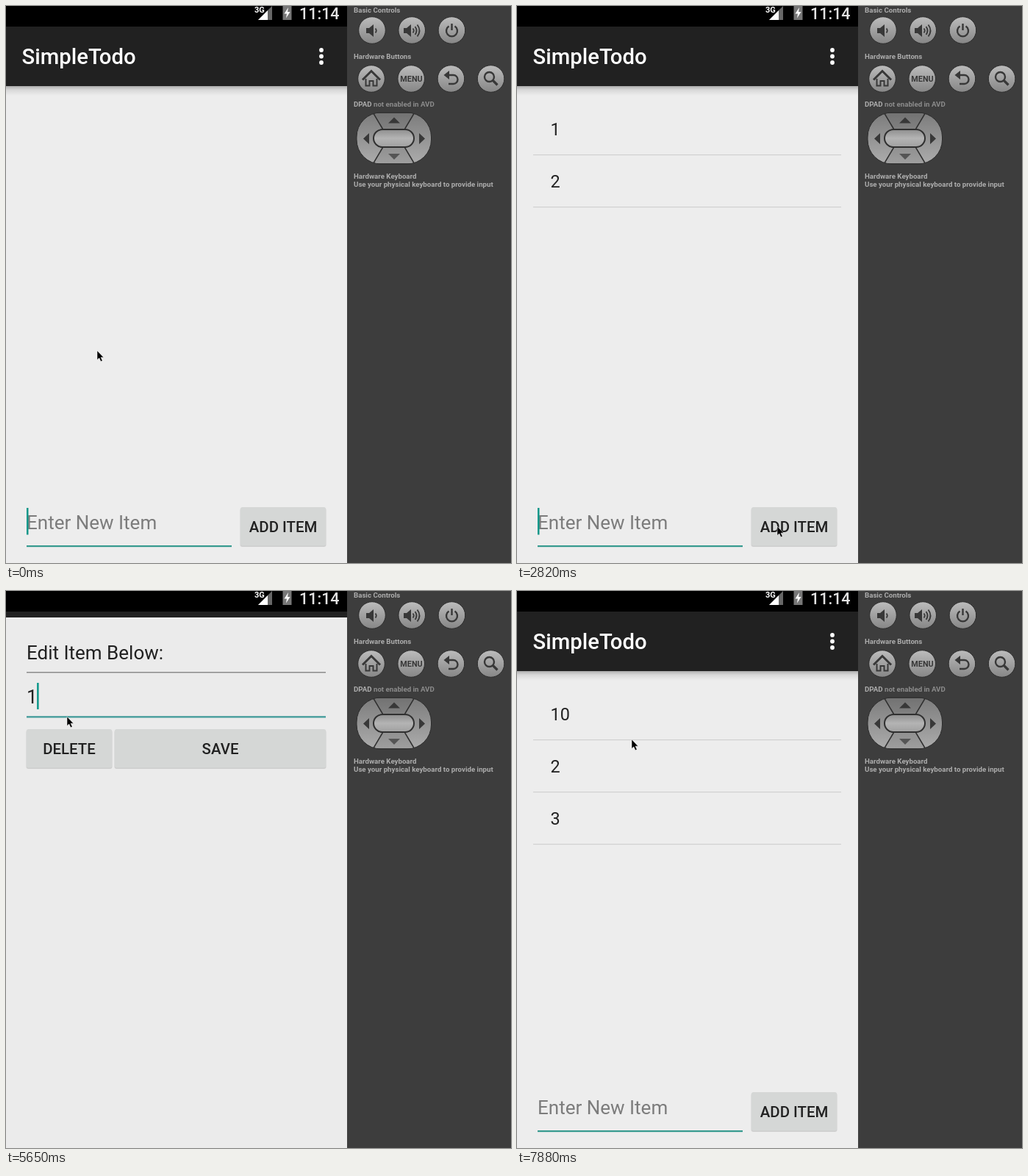
An HTML page that plays this animation: 687 px wide and 758 px high, repeating every 8000 ms.

```html
<!DOCTYPE html>
<html lang="en">
<head>
<meta charset="utf-8">
<title>Todo app demo</title>
<style>
  html, body { margin: 0; width: 100%; height: 100%; overflow: hidden; background: #3d3d3d }
  svg { display: block; font-family: Roboto, sans-serif }
  .field { font-size: 26px; fill: #212121 }
  .row { font-size: 23.4px; fill: #212121 }
  .btn { font-size: 20.4px; font-weight: 500; fill: #212121; text-anchor: middle }
  .label { font-size: 9.7px; font-weight: 700; fill: #adadad }
  .hint { fill: #7c7c7c }
  .caret { fill: #0c978a }
  .icon { fill: none; stroke: #383838; stroke-width: 2.4 }
  .solid { fill: #383838; stroke: none }
</style>
</head>
<body>
<svg width="687" height="758" viewBox="0 0 687 758">
  <defs>
    <linearGradient id="metal" x2="0" y2="1">
      <stop stop-color="#bcbcbc"/><stop offset="1" stop-color="#868686"/>
    </linearGradient>
    <linearGradient id="plate" x2="0" y2="1">
      <stop stop-color="#7c7c7c"/><stop offset="1" stop-color="#acacac"/>
    </linearGradient>
    <linearGradient id="pill" x2="0" y2="1">
      <stop stop-color="#8e8e8e"/><stop offset=".5" stop-color="#b4b4b4"/><stop offset="1" stop-color="#a0a0a0"/>
    </linearGradient>
    <linearGradient id="shade" x2="0" y2="1">
      <stop stop-color="#000" stop-opacity=".27"/><stop offset=".4" stop-color="#000" stop-opacity=".09"/>
      <stop offset="1" stop-color="#000" stop-opacity="0"/>
    </linearGradient>
    <clipPath id="screen"><path d="M0 28H464V758H0z"/></clipPath>
    <clipPath id="pad"><rect x="477" y="145" width="101.500" height="70" rx="33"/></clipPath>
  </defs>

  <!-- list screen -->
  <rect width="464" height="758" fill="#ededed"/>
  <rect y="109" width="464" height="13" fill="url(#shade)"/>
  <rect y="28" width="464" height="81" fill="#212121"/>
  <text x="21.500" y="79" font-size="29.300" font-weight="500" fill="#fff">SimpleTodo</text>
  <g fill="#fff"><circle cx="429" cy="60" r="2.900"/><circle cx="429" cy="68.500" r="2.900"/><circle cx="429" cy="77" r="2.900"/></g>
  <rect id="ripple" x="22" y="133" width="419" height="69"/>
  <g id="rows"></g>
  <text id="entry" class="field" x="28" y="712"></text>
  <rect id="entryCaret" class="caret" y="683" width="2.500" height="36.500"/>
  <rect x="28" y="734" width="279" height="2.200" fill="#369a8f"/>
  <g id="add"></g>

  <!-- edit screen -->
  <g clip-path="url(#screen)"><g id="edit">
    <rect y="28" width="464" height="758" fill="#ebebeb"/>
    <text class="field" x="28" y="85">Edit Item Below:</text>
    <rect x="28" y="102" width="407" height="1.500" fill="#8b8b8b"/>
    <text id="value" class="field" x="28" y="145"></text>
    <rect id="valueCaret" class="caret" y="117" width="2.500" height="36"/>
    <rect x="28" y="162.200" width="407" height="2.300" fill="#429b9a"/>
    <g id="delete"></g><g id="save"></g>
  </g></g>

  <!-- status bar -->
  <rect width="464" height="28"/>
  <text x="338" y="9" font-size="11" font-weight="700" fill="#fff">3G</text>
  <path d="M343 19L362 0V19z" fill="#666"/><path d="M343 19L356 6V19z" fill="#fff"/>
  <path d="M376.500 0H388.500V19H376.500z" fill="#777"/>
  <path d="M384 2L378.500 10.500H382L381 16.500L386.500 8H383z" fill="#fff"/>
  <text x="399" y="18" font-size="21.500" font-weight="500" fill="#e4e4e4">11:14</text>

  <!-- emulator panel -->
  <rect x="464" width="223" height="758" fill="#3d3d3d"/>
  <g class="label">
    <text x="473" y="8.500">Basic Controls</text>
    <text x="473" y="71.500">Hardware Buttons</text>
    <text x="473" y="137">DPAD <tspan fill="#8c8c8c">not enabled in AVD</tspan></text>
    <text x="473" y="235">Hardware Keyboard</text>
    <text x="473" y="246">Use your physical keyboard to provide input</text>
  </g>
  <g id="knobs" fill="url(#metal)" stroke="#2c2c2c"></g>
  <g class="icon">
    <path class="solid" d="M490 30h4l6-5v17l-6-5h-4z"/><path d="M502.500 30.500q2.500 3 0 6" stroke-width="1.800"/>
    <path class="solid" d="M541 30h4l6-5v17l-6-5h-4z"/>
    <path d="M553.500 30.500q2.500 3 0 6M556.500 28q4 5.500 0 11M559.500 25.500q6 8 0 16" stroke-width="1.800"/>
    <path d="M602.500 27.500a7.500 7.500 0 1 0 8 0M606.500 24v9"/>
    <path d="M485 100.500L497 88.500L509 100.500" stroke-width="3"/>
    <path d="M489.500 99V108.500H494.500V102H499.500V108.500H504.500V99" stroke-width="2"/>
    <path d="M600 94h8.500a6 6 0 0 1 0 12H602"/><path class="solid" d="M595.500 94l7.500-6v12z"/>
    <circle cx="657.500" cy="96.500" r="6.500"/><path d="M662 101l6.500 6.500" stroke-width="3.200"/>
  </g>
  <text x="551.500" y="103" font-size="10.800" font-weight="700" fill="#383838" text-anchor="middle">MENU</text>
  <g clip-path="url(#pad)" stroke="#303030" stroke-width="1.600">
    <path d="M470 145H590V215H470z" fill="url(#plate)"/>
    <path d="M498 143L514 170H541L557 143zM498 217L514 190H541L557 217z" fill="#000" fill-opacity=".08"/>
  </g>
  <rect x="477" y="145" width="101.500" height="70" rx="33" fill="none" stroke="#2c2c2c"/>
  <rect x="500" y="168" width="55" height="24" rx="12" fill="url(#pill)" stroke="#303030" stroke-width="2"/>
  <path class="solid" d="M520 159.500l8-8 8 8zM494 173v15l-8-7.500zM562 173v15l8-7.500z"/>
  <path d="M520 201l8 8 8-8z" fill="#555"/>

  <path id="mouse" d="M0 0V12.500L2.800 10L5 14.800L7.200 13.800L5.100 9.200H8.800z" stroke="#fff" stroke-width=".5"/>
</svg>
<script>
const LOOP = 8000, TICK = 148.6, CHAR = 14.6, BLINK = 3;

// The story, in ticks
const ITEMS = [{ typed: 4, add: 9 }, { typed: 14, add: 17 }, { typed: 22, add: 25 }];
const OPEN = 36, RETYPE = 44, SAVE = 49, SLIDE = 3;
const MOVES = [
  { from: 2, to: 7, x: 354, y: 708 },
  { from: 26, to: 30, x: 90, y: 57 },
  { from: 30, to: 32, x: 83, y: 171 },
  { from: 45, to: 49, x: 206, y: 202 },
  { from: 50, to: 53, x: 156, y: 202 }
];

const $ = id => document.getElementById(id);
const set = (el, attrs) => { for (const k in attrs) el.setAttribute(k, attrs[k]); };
const ramp = (n, from, to) => Math.min(1, Math.max(0, (n - from) / (to - from)));
const smooth = p => p * p * (3 - 2 * p);
const glow = (n, start) => n < start ? 0 : 1 - ramp(n, start, start + 2);
const blink = age => age % (2 * BLINK) < BLINK ? 1 : 0;

for (let row = 0; row < 2; row++)
  for (let i = 0; i < 3 + row; i++)
    $('knobs').innerHTML += `<circle cx="${498 - row + 54.2 * i}" cy="${33 + 66 * row}" r="18.3"/>`;

function button(id, x, y, w, label) {
  $(id).innerHTML = `<rect x="${x - .5}" y="${y + 1}" width="${w + 1}" height="53" rx="3" fill="#000" opacity=".13"/>
    <rect class="lift" x="${x - 1}" y="${y}" width="${w + 2}" height="56" rx="4" fill="#000"/>
    <rect class="face" x="${x}" y="${y}" width="${w}" height="52.500" rx="2.500"/>
    <text class="btn" x="${x + w / 2}" y="${y + 33.8}">${label}</text>`;
  press(id, 0);
}

function press(id, amount) {
  const c = 214 - 24 * amount;
  set($(id).querySelector('.face'), { fill: `rgb(${c - 1},${c + 1},${c})` });
  set($(id).querySelector('.lift'), { opacity: .12 * amount });
}

button('add', 319, 682, 116, 'ADD ITEM');
button('delete', 28, 180, 116, 'DELETE');
button('save', 148, 180, 287, 'SAVE');

function drawList(n, first) {
  const names = [first, '2', '3'];
  const count = ITEMS.filter(item => n > item.add).length;
  $('rows').innerHTML = names.slice(0, count).map((name, i) => {
    const y = 70.8 * i;
    return `<text class="row" x="45.500" y="${176.3 + y}">${name}</text>
      <rect x="22" y="${202 + Math.round(y)}" width="419" height="1.200" fill="#d0d0d0"/>`;
  }).join('');

  const typed = count < 3 && n >= ITEMS[count].typed ? names[count] : '';
  const lastInput = Math.max(0, ...ITEMS.flatMap(i => [i.typed, i.add + 1]).filter(k => k <= n));
  $('entry').textContent = typed || 'Enter New Item';
  $('entry').classList.toggle('hint', !typed);
  set($('entryCaret'), { x: 28 + CHAR * typed.length, opacity: blink(n - lastInput) });
  set($('ripple'), { opacity: .08 * glow(n, OPEN) });
  press('add', Math.max(...ITEMS.map(item => glow(n, item.add))));
}

function drawEdit(n, text) {
  const lastInput = n < RETYPE ? OPEN + 2 : RETYPE;
  const shown = Math.min(ramp(n, OPEN, OPEN + SLIDE), 1 - ramp(n, SAVE + 1, SAVE + 1 + SLIDE));
  $('value').textContent = text;
  set($('valueCaret'), { x: 27.5 + CHAR * text.length, opacity: n < SAVE ? blink(Math.max(0, n - lastInput)) : 0 });
  set($('edit'), { opacity: Math.min(1, 1.5 * shown), transform: `translate(0 ${72 * (1 - shown) ** 2})` });
  press('save', glow(n, SAVE));
}

function drawMouse(n) {
  let x = 124, y = 469;
  for (const m of MOVES) {
    const p = smooth(ramp(n, m.from, m.to));
    x += (m.x - x) * p;
    y += (m.y - y) * p;
  }
  set($('mouse'), { transform: `translate(${Math.round(x)} ${Math.round(y)})` });
}

let shownTick = -1;
function frame() {
  const n = Math.floor((performance.now() % LOOP + 6.5) / TICK);
  if (n !== shownTick) {
    shownTick = n;
    const first = n < RETYPE ? '1' : '10';
    drawList(n, first);
    drawEdit(n, first);
    drawMouse(n);
  }
  requestAnimationFrame(frame);
}
frame();
</script>
</body>
</html>
```
